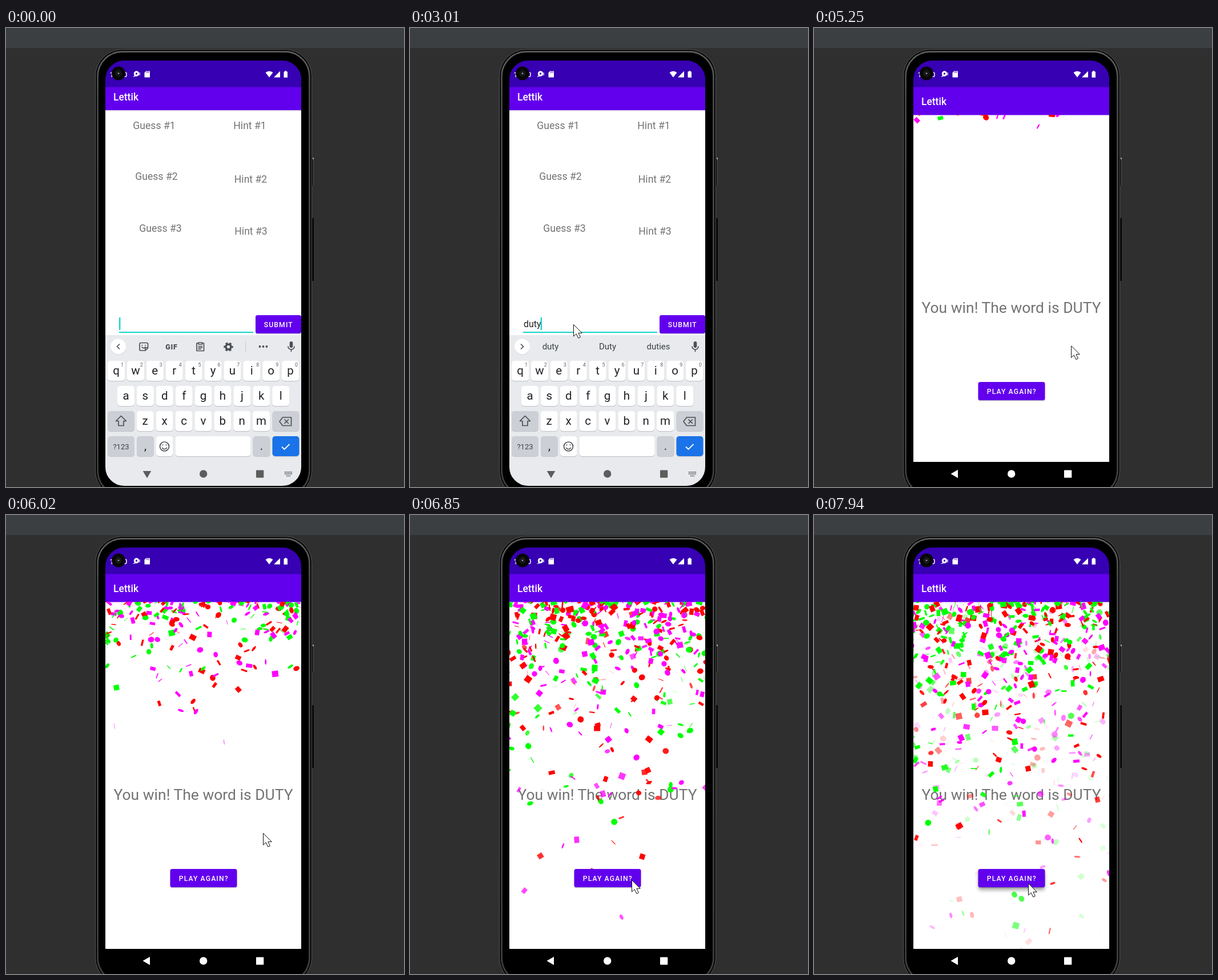
An HTML page with a canvas that plays this animation: 697x804 px, repeating every 8 s.

```html
<!DOCTYPE html>
<html lang="en">
<head>
<meta charset="utf-8">
<title>Word game</title>
<style>
html, body { margin: 0; width: 100%; height: 100%; overflow: hidden; background: #2f2f30; }
svg, canvas { position: absolute; left: 0; top: 0; display: block; }
#confetti { left: 174px; top: 152px; }
text { font-family: Roboto, sans-serif; }
.title { font-size: 17.46px; font-weight: 500; fill: #fff; }
.label { font-size: 17.6px; fill: #737373; text-anchor: middle; }
.win { font-size: 26.45px; fill: #737373; text-anchor: middle; }
.button { font-size: 12.2px; font-weight: 500; letter-spacing: 1.12px; fill: #fff; text-anchor: middle; }
.key { font-size: 20.5px; fill: #202124; text-anchor: middle; }
.digit { font-size: 9px; fill: #5f6368; text-anchor: middle; }
.small { font-size: 13px; fill: #3c4043; text-anchor: middle; }
.hint { font-size: 15px; fill: #3c4043; text-anchor: middle; }
.line { fill: none; stroke: #4c4f54; stroke-width: 1.7; stroke-linejoin: round; stroke-linecap: round; }
</style>
</head>
<body>
<svg width="697" height="804" viewBox="0 0 697 804">
  <defs>
    <clipPath id="screen"><rect x="173" y="56" width="345" height="747" rx="33"/></clipPath>
    <linearGradient id="rim" x1="0" y1="0" x2="0" y2="1">
      <stop offset="0" stop-color="#606262"/><stop offset=".1" stop-color="#4c4e4e"/><stop offset="1" stop-color="#404141"/>
    </linearGradient>
    <filter id="soft" x="-20%" y="-50%" width="140%" height="220%"><feGaussianBlur stdDeviation="3"/></filter>
  </defs>
  <rect width="697" height="804" fill="#2f2f30"/>
  <rect width="697" height="35" fill="#3c3f41"/>
  <rect x="535" y="227" width="4" height="49" rx="1" fill="#111"/>
  <path d="M538 227v3" stroke="#ddd" stroke-width="1.5"/>
  <path d="M538.5 230v46" stroke="#555"/>
  <rect x="535" y="333" width="4" height="110" rx="1" fill="#050505"/>
  <rect x="156.500" y="37.500" width="379" height="785" rx="47" fill="#060606" stroke="#555757"/>
  <rect x="160.500" y="41.500" width="371" height="777" rx="43" fill="none" stroke="url(#rim)" stroke-width="2.500"/>
  <rect x="163" y="44" width="366" height="772" rx="41" fill="#000"/>

  <g clip-path="url(#screen)">
    <rect x="173" y="56" width="345" height="747" fill="#fff"/>
    <g id="game">
      <rect x="173" y="103" width="345" height="41" fill="#6200ee"/>
      <rect x="173" y="144" width="345" height="2" fill="#000" opacity=".07"/>
      <text class="title" x="188" y="126.500">Lettik</text>
      <g class="label">
        <text x="259.500" y="177">Guess #1</text><text x="427" y="177">Hint #1</text>
        <text x="263.500" y="265.500">Guess #2</text><text x="428.500" y="270.500">Hint #2</text>
        <text x="270.500" y="356.500">Guess #3</text><text x="429" y="361.500">Hint #3</text>
      </g>
      <rect x="198" y="532" width="235" height="2" fill="#14d3ca"/>
      <text id="input" x="199" y="524" font-size="16" fill="#222"></text>
      <rect id="caret" y="507" width="2.400" height="22" fill="#14d3ca"/>
      <rect x="437" y="504" width="80" height="32" rx="3.500" opacity=".2"/>
      <rect x="437" y="503" width="80" height="32" rx="3.500" fill="#6200ee"/>
      <rect id="press" x="437" y="503" width="80" height="32" rx="3.500" fill="#fff"/>
      <text class="button" x="477.300" y="523.500">SUBMIT</text>
    </g>
    <g id="win">
      <rect x="173" y="90" width="345" height="720" fill="#fff"/>
      <rect x="173" y="90" width="345" height="62.500" fill="#6200ee"/>
      <text class="title" x="188" y="135">Lettik</text>
      <text class="win" x="345.500" y="499">You win! The word is DUTY</text>
    </g>
    <rect x="173" y="56" width="345" height="47.500" fill="#3700b3"/>
    <text x="181.500" y="85.500" font-size="12.200" font-weight="500" fill="#fff">11:00</text>
    <circle cx="197" cy="79.500" r="12" fill="#070707"/>
    <circle cx="197" cy="79.500" r="5" fill="#151515" stroke="#222"/>
    <circle cx="197" cy="79.500" r="1.500" fill="#889"/>
    <g fill="#fff">
      <circle cx="228.500" cy="80" r="4.700"/><path d="M222 86l5-5 2 3zM233.500 78h1.200v5h-1.200z"/>
      <path d="M245 75.500h7v11h-9.500v-8z"/>
      <path d="M454.500 78q6.500-5 13 0l-6.500 8.500zM480 75.500v11h-11zM486.500 76.500h1.700V75h3v1.500h1.800v10.300h-6.500z"/>
    </g>
    <circle cx="228.500" cy="80" r="1.700" fill="#3700b3"/>
    <path d="M246 76v3m2-3v3m2-3v3" stroke="#3700b3" stroke-width=".7"/>
  </g>
</svg>

<canvas id="confetti" width="343" height="608"></canvas>

<svg width="697" height="804" viewBox="0 0 697 804">
  <g clip-path="url(#screen)">
    <g id="again">
      <rect id="lift" x="288" y="625" width="116" height="32" rx="4" filter="url(#soft)"/>
      <rect x="287.500" y="621.500" width="117" height="32" rx="3.500" opacity=".22"/>
      <rect x="287.500" y="620" width="117" height="32" rx="3.500" fill="#6200ee"/>
      <text class="button" x="346.300" y="640.500">PLAY AGAIN?</text>
    </g>
    <g id="keyboard">
      <rect x="173" y="538" width="345" height="270" fill="#e8eaed"/>
      <circle cx="196.500" cy="558.700" r="13.500" fill="#c9ccd1"/>
      <circle cx="196.500" cy="558" r="13.500" fill="#fff"/>
      <path id="chevron" class="line" d="M198.500 554l-4 4 4 4"/>
      <g id="tools">
        <g class="line">
          <path d="M236 551.500h10.500a2 2 0 0 1 2 2v7l-4.500 4.500h-8a2 2 0 0 1-2-2v-9.500a2 2 0 0 1 2-2zM248.500 560h-4.500v5M238 559q3 3.500 6 0M238.500 555.500v.5M244 555.500v.5"/>
          <path d="M336.500 552h-2.500v13.500h12.500V552H344M337 551h6.500v3H337zM337 557.500h6.500M337 560h6.500M337 562.500h4"/>
        </g>
        <text x="290" y="562.500" font-size="12.500" font-weight="900" letter-spacing=".8" fill="#4c4f54" text-anchor="middle">GIF</text>
        <circle cx="389.500" cy="558.500" r="4.500" fill="none" stroke="#4c4f54" stroke-width="3.600"/>
        <circle cx="389.500" cy="558.500" r="7" fill="none" stroke="#4c4f54" stroke-width="2.400" stroke-dasharray="3.665" stroke-dashoffset="1.800"/>
        <path d="M419.500 548v20" stroke="#c6c9ce"/>
        <g fill="#4c4f54"><circle cx="444.500" cy="558" r="1.900"/><circle cx="450.500" cy="558" r="1.900"/><circle cx="456.500" cy="558" r="1.900"/></g>
      </g>
      <g id="hints" class="hint">
        <text x="246" y="563"></text><text x="346" y="563"></text><text x="435" y="563"></text>
      </g>
      <rect x="496.700" y="549" width="5.600" height="11" rx="2.800" fill="#4c4f54"/>
      <path class="line" d="M494 558a5.500 5 0 0 0 11 0M499.500 563.500v3"/>
      <g id="keys"></g>
      <path class="line" d="M201.500 679.500l9 9h-4.500v8h-9v-8h-4.500z"/>
      <path class="line" d="M484.500 682h15v14.500h-15l-5.500-7.250zM488 686l6.500 6.500m0-6.500l-6.500 6.500"/>
      <g class="line"><circle cx="277.500" cy="733" r="8"/><path d="M273.500 735.500q4 4.500 8 0M274.500 730v.6M280.500 730v.6"/></g>
      <path d="M483 733.500l4.500 4.500 9-9" fill="none" stroke="#fff" stroke-width="1.800"/>
      <path d="M488 778h13m-13 3h13m-10 3.500h7" stroke="#5f6368" stroke-width="1.800" stroke-dasharray="1.800 1"/>
    </g>
    <g id="bar"><rect x="173" y="760" width="345" height="55"/></g>
    <g id="nav">
      <path id="back" d="M239.500 781l12.500-7.300v14.600z"/>
      <circle cx="345.700" cy="781" r="6.700"/>
      <rect x="438" y="774.500" width="13.300" height="13.300" rx="1"/>
    </g>
  </g>
  <rect x="171" y="54" width="349" height="751" rx="36" fill="none" stroke="#000" stroke-width="6"/>
  <circle id="click" r="16" fill="#ff0" fill-opacity=".47"/>
  <path id="pointer" d="M.5.500v20.500l4.700-4.300 3.600 7.500 3.600-1.600-3.500-7.300h6.300z" fill="#fff" stroke="#111"/>
</svg>

<script>
const $ = id => document.getElementById(id);
const LOOP = 8000, LEAVE = 4230, BURST = 5130;
const clamp = x => Math.max(0, Math.min(1, x));
const show = (id, on) => $(id).setAttribute('visibility', on ? 'visible' : 'hidden');
const fade = (id, a) => $(id).setAttribute('opacity', a);
const place = (id, x, y) => $(id).setAttribute('transform', `translate(${x} ${y})`);

// Keyboard
let keys = '';
function addKey(x, y, w, text = '', cls = 'key', fill = '#fff') {
  keys += `<rect x="${x}" y="${y + 1}" width="${w}" height="35.300" rx="5" fill="#c3c6cb"/>
    <rect x="${x}" y="${y}" width="${w}" height="35" rx="5" fill="${fill}"/>
    <text class="${cls}" x="${x + w / 2}" y="${y + (cls === 'small' ? 23 : 24)}">${text}</text>`;
}
const PITCH = 33.9, GREY = '#cccfd6';
[['qwertyuiop', 178, 583], ['asdfghjkl', 195, 627], ['zxcvbnm', 228.7, 671]].forEach(([row, x, y], r) =>
  [...row].forEach((c, i) => {
    addKey(x + i * PITCH, y, 30, c);
    if (!r) keys += `<text class="digit" x="${203.5 + i * PITCH}" y="592.500">${(i + 1) % 10}</text>`;
  }));
addKey(178, 671, 47, '', 'key', GREY);
addKey(466.5, 671, 47, '', 'key', GREY);
addKey(178, 715, 47, '?123', 'small', GREY);
addKey(229, 715, 30, ',', 'key', GREY);
addKey(263, 715, 29.5);
addKey(296.5, 715, 132);
addKey(432.5, 715, 30, '.', 'key', GREY);
addKey(466.5, 715, 47, '', 'key', '#1a73e8');
$('keys').innerHTML = keys;

// Time tables: the last entry whose time has passed counts
const at = (table, t) => table.filter(e => e[0] <= t).pop();
const typed = [[0, ''], [2070, 'd'], [2350, 'du'], [2620, 'dut'], [2750, 'duty']];
const hints = [[0], [2350, 'du', 'due', 'dude'], [2620, 'dut', 'duty', 'dutch'],
  [3010, 'duty', 'Duty', 'duties'], [LEAVE, '', '', '']];
const blink = [[0, 1], [130, 0], [600, 1], [1070, 0], [1610, 1], [3510, 0], [4010, 1]];
const path = [[330, 552, 759], [1070, 286, 519], [3410, 286, 519], [3800, 390, 527], [4000, 455, 522],
  [4700, 455, 522], [5300, 450, 557], [6600, 450, 557], [6850, 388, 639], [7050, 375, 645], [LOOP, 375, 645]];

function pointerAt(t) {
  const i = Math.max(1, path.findIndex(p => p[0] > t));
  const [t0, x0, y0] = path[i - 1], [t1, x1, y1] = path[i];
  const k = clamp((t - t0) / (t1 - t0)), e = k * k * (3 - 2 * k);
  return [x0 + (x1 - x0) * e, y0 + (y1 - y0) * e];
}

// Confetti: each piece is a function of its number and age
const ctx = $('confetti').getContext('2d');
const RATE = 560, LIFE = 2.35, COLORS = ['#f00', '#0f0', '#f0f'];
const rnd = (i, k) => { const s = Math.sin(i * 12.9898 + k * 78.233) * 43758.5453; return s - Math.floor(s); };

function drawConfetti(time) {
  ctx.clearRect(0, 0, 343, 608);
  for (let i = Math.max(0, Math.ceil((time - LIFE) * RATE)); i < time * RATE; i++) {
    const age = time - i / RATE, angle = rnd(i, 1) * Math.PI * 2, speed = 30 + 235 * rnd(i, 2) ** 1.3;
    const x = -35 + 413 * rnd(i, 3) + Math.cos(angle) * speed * age * .4;
    const y = -8 + Math.sin(angle) * speed * age + 48 * age * age;
    if (y < -10 || y > 618) continue;
    const size = rnd(i, 4) < .5 ? 9.5 : 11;
    const flip = Math.abs(((rnd(i, 5) + age * (.7 + rnd(i, 6))) % 1) * 2 - 1);
    ctx.save();
    ctx.globalAlpha = clamp((LIFE - age) / .95);
    ctx.fillStyle = COLORS[Math.floor(rnd(i, 7) * 3)];
    ctx.translate(x, y);
    ctx.rotate(rnd(i, 8) * 6.28 + age * (3 + 3 * rnd(i, 9)));
    ctx.scale(flip, 1);
    ctx.beginPath();
    if (rnd(i, 10) < .5) ctx.arc(0, 0, size / 2, 0, 7);
    else ctx.rect(-size / 2, -size / 2, size, size);
    ctx.fill();
    ctx.restore();
  }
}

function render(t) {
  const word = at(typed, t)[1];
  $('input').textContent = word;
  $('caret').setAttribute('x', 198 + (word ? $('input').getComputedTextLength() : 0));
  show('caret', at(blink, t)[1]);
  fade('press', t > 4010 ? .2 * clamp((t - 4010) / 120) : 0);

  const suggesting = t >= 2350;
  show('tools', !suggesting);
  $('chevron').setAttribute('transform', suggesting ? 'rotate(180 196.5 558)' : '');
  [...$('hints').children].forEach((el, i) => el.textContent = at(hints, t)[i + 1] || '');

  // Screen change, with the keyboard sliding away
  const k = clamp((t - LEAVE) / 200), settle = 1 - (1 - clamp((t - LEAVE) / 180)) ** 3;
  const lift = -9 * (1 - settle), arrived = t >= LEAVE ? clamp((t - LEAVE + 15) / 60) : 0;
  fade('win', arrived);
  place('win', 0, lift);
  fade('again', arrived);
  place('again', 0, lift);
  fade('lift', .35 * clamp((t - 7780) / 120));
  place('keyboard', 0, 290 * k * k);
  fade('keyboard', 1 - .93 * k);
  show('keyboard', k < 1);
  fade('bar', clamp(k * 1.25));
  place('bar', 0, lift);
  const tone = Math.round(92 + 163 * clamp(k * 2.2));
  $('nav').setAttribute('fill', `rgb(${tone},${tone},${tone})`);
  $('back').setAttribute('transform', `rotate(${-90 * (1 - k) ** 1.8} 247 781)`);

  drawConfetti((t - BURST) / 1000);

  const [x, y] = pointerAt(t);
  show('pointer', t >= 330);
  place('pointer', x, y);
  show('click', (t >= 1340 && t < 1410) || (t >= 4010 && t < 4080));
  place('click', x, y);
}

const start = performance.now();
function tick() {
  render((performance.now() - start) % LOOP);
  requestAnimationFrame(tick);
}
tick();
</script>
</body>
</html>
```
